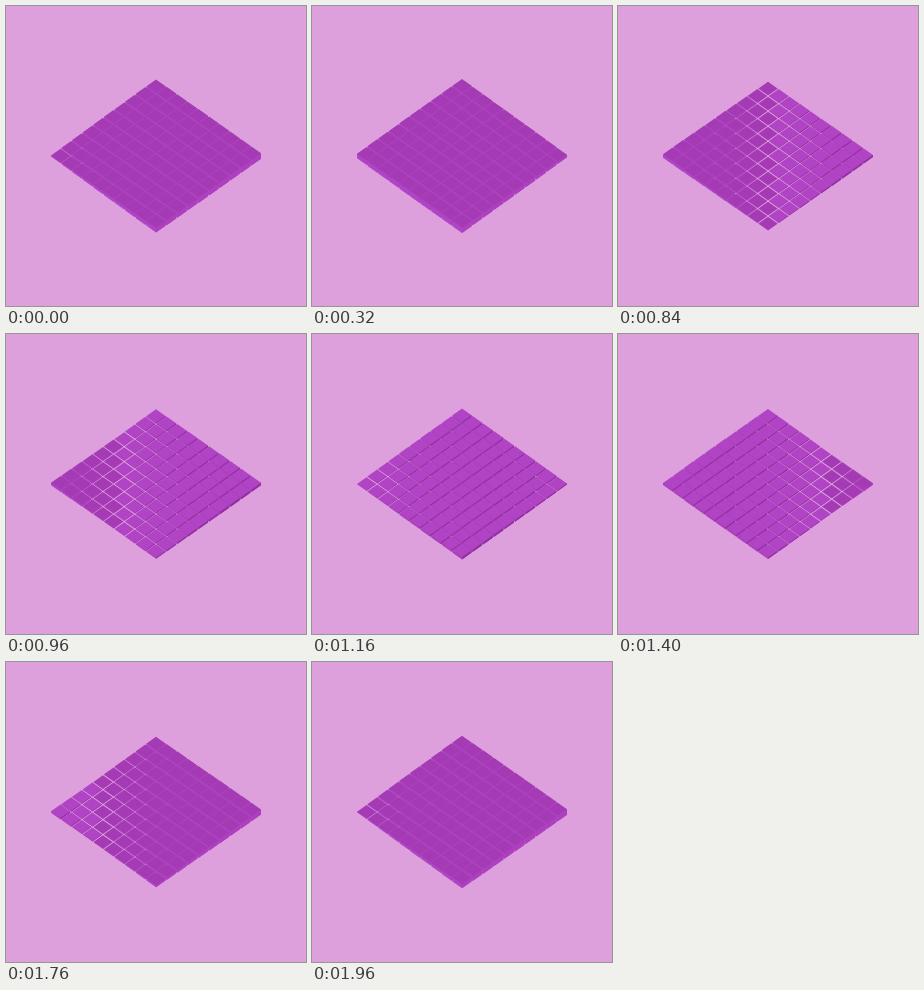
An HTML page with a canvas for the animation above (2 s loop, 300 by 300 pixels).

```html
<!DOCTYPE html>
<html lang="en">
<head>
<meta charset="utf-8">
<title>Tile wave</title>
<style>
  html, body { margin: 0; width: 100%; height: 100%; overflow: hidden; background: #dda0dd; }
  canvas { display: block; width: 300px; height: 300px; }
</style>
</head>
<body>
<canvas id="stage" width="300" height="300"></canvas>
<script>
const ctx = document.getElementById('stage').getContext('2d');
const LOOP = 2000, STEP = 40;
const COUNT = 10, PITCH = 15, SIZE = 13.5;
const TILT = Math.SQRT1_2;           // camera looks down at 45 degrees
const HALF_W = SIZE * Math.SQRT1_2;
const HALF_H = HALF_W * TILT;

const BACK = '#dda0dd';
const RAISED = { top: '#a53bb4', left: '#b044c6', right: '#ad40be' };
const SUNKEN = { top: '#b144c4', left: '#ab40bd', right: '#9230a1' };

function fill(color, points) {
  ctx.fillStyle = color;
  ctx.beginPath();
  for (const [x, y] of points) ctx.lineTo(x, y);
  ctx.closePath();
  ctx.fill();
}

// Below zero the box is inside out and its shading flips.
function heightAt(column, time) {
  const phase = 2 * Math.PI * (time - 220) / LOOP + column * 0.107;
  return 2.2 + 5.5 * Math.cos(phase);
}

function drawTile(x, y, height) {
  const shade = height >= 0 ? RAISED : SUNKEN;
  const lift = Math.abs(height) * TILT / 2;
  const up = y - lift, down = y + lift;
  const left = x - HALF_W, right = x + HALF_W;
  const top = [[x, up - HALF_H], [right, up], [x, up + HALF_H], [left, up]];

  // Walls reach the tile's middle line so no seam shows under the top
  fill(shade.left, [[left, up], [right, up], [right, down], [x, down + HALF_H], [left, down]]);
  fill(shade.right, [[x, up], [right, up], [right, down], [x, down + HALF_H]]);
  fill(shade.top, top);
}

function draw(time) {
  ctx.fillStyle = BACK;
  ctx.fillRect(0, 0, 300, 300);
  const last = COUNT - 1;
  for (let row = 0; row <= 2 * last; row++) {
    for (let i = Math.max(0, row - last); i <= Math.min(last, row); i++) {
      const column = 2 * i - row;
      const x = 150 + column * PITCH * Math.SQRT1_2;
      const y = 150 + (row - last) * PITCH * Math.SQRT1_2 * TILT;
      drawTile(x, y, heightAt(column, time));
    }
  }
}

function frame() {
  const time = performance.now() % LOOP;
  draw(Math.floor(time / STEP) * STEP);
  requestAnimationFrame(frame);
}
frame();
</script>
</body>
</html>
```
